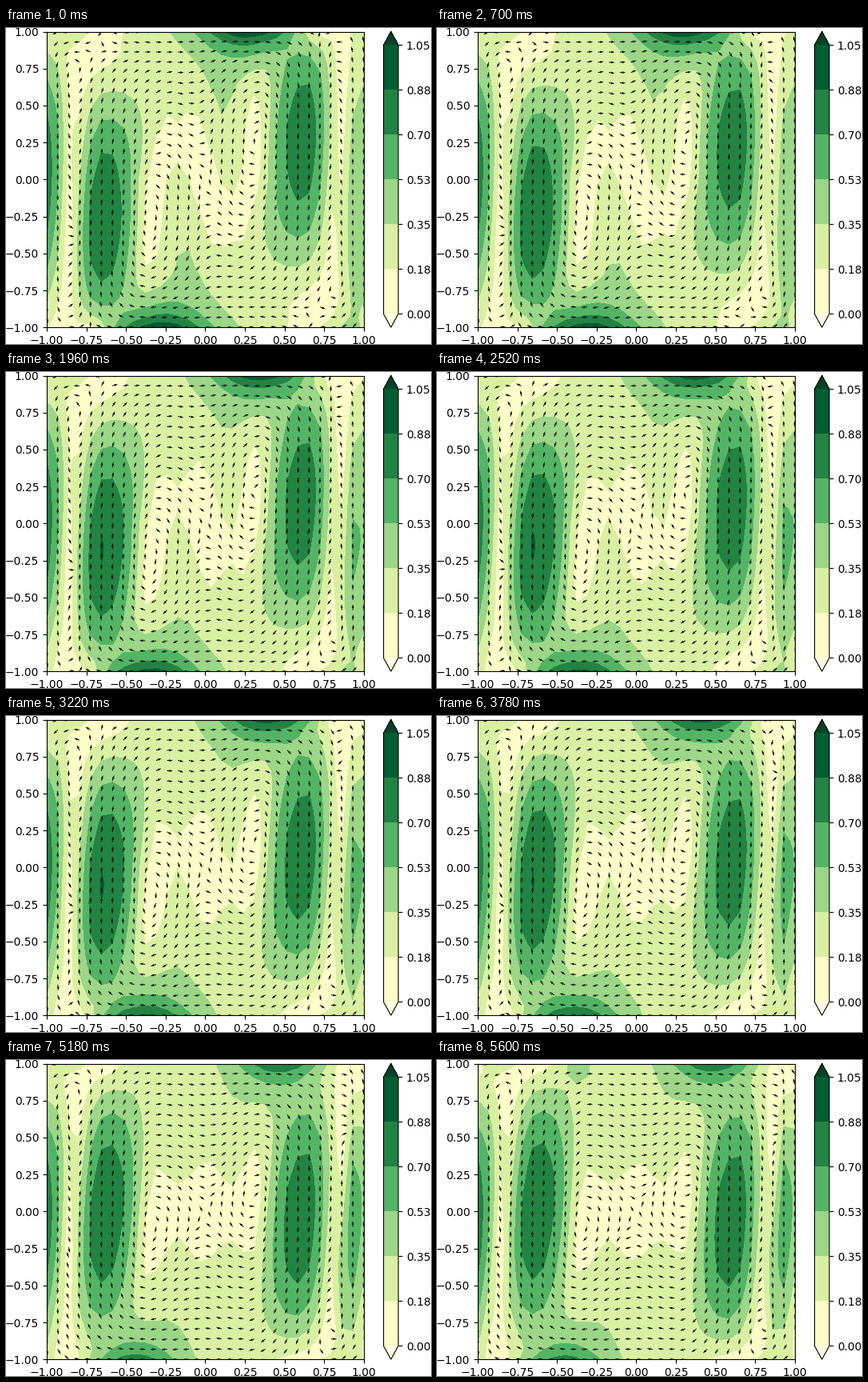
A matplotlib script for the animation above (5740 ms loop, 532 by 395 pixels).

```python
import numpy as np
import matplotlib.pyplot as plt
from matplotlib.animation import FuncAnimation

WIDTH, HEIGHT, DPI = 532, 395, 100
TICKS, INTERVAL = 41, 140
HOLDS = (2, 7, 11, 15, 19, 22, 26, 30, 34, 38)  # ticks that repeat the previous state
STEPS = TICKS - len(HOLDS) - 1
LEVELS = np.linspace(0, 1.05, 7)

axis = np.linspace(-1, 1, 30)
X, Y = np.meshgrid(axis, axis)


def jet(d, height, sigma, depth):
    """Wall jet: steep on its outer side (d > 0), soft on the inner one."""
    outer = np.cos(np.clip(d / 0.46, 0, 1) * np.pi / 2)
    inner = np.exp(-(d / sigma) ** 2 / 2)
    return np.where(d > 0, outer, inner) * np.exp((height - 1) / depth)


def lobe(y, center, k_below, k_above):
    """Vertical profile of a current, fading at the walls."""
    d = y - center
    return np.cos(d * np.where(d < 0, k_below, k_above)) * (1 - 0.7 * y ** 12)


def horizontal(t, mix):
    window = np.clip(1 - (X / 0.95) ** 2, 0, None)
    shear = np.sin(mix(1.3, 2.1) * (Y - mix(1.0, 0.25) * X))
    u = mix(0.22, 0.27) * shear * window * (1 + mix(0.4, 0.1) * Y ** 2)
    sigma, depth = mix(0.22, 0.2), mix(0.2, 0.17)
    u += mix(0.78, 0.65) * jet(X - mix(0.28, 0.5), Y, sigma, depth)
    u -= mix(0.77, 0.55) * jet(-X - mix(0.29, 0.47), -Y, sigma, depth)
    u += 0.22 * t ** 6 * np.exp(-((X + 0.38) / 0.13) ** 2 - ((Y - 1) / 0.16) ** 2)
    # Return flow between the side currents and the walls
    strength = np.where(X * Y < 0, mix(0.35, 0.28), 0.15)
    u -= strength * Y ** 5 * np.exp(-((np.abs(X) - 0.83) / 0.2) ** 2)
    return u


def wave_phase(t, mix):
    """Phase in quarter waves: zeros at even values, peaks at odd ones."""
    rows = []
    for y in axis:
        skew = mix(0.2, 0) * y
        left, middle, right = -0.34 + max(skew, 0), -skew, 0.31 + min(skew, 0)
        knots = [-1.04, -0.85, -0.64, left, (left + middle) / 2, middle,
                 (middle + right) / 2, right, 0.615, 0.835, mix(0.97, 0.925), 1.1]
        quarters = [*range(-1, 10), mix(9.5, 10.1)]
        rows.append(np.interp(axis - mix(0.03, 0.05) * y, knots, quarters))
    return np.array(rows)


def vertical(t, mix):
    phase = wave_phase(t, mix)
    left_edge = mix(0.87, 0.89) * np.cos(1.35 * (Y - mix(0.0, -0.12)))
    right_edge = mix(0.5, 0.66) * np.cos(mix(1.05, 1.4) * (Y + 0.11))
    left = (0.863 + 0.022 * np.sin(np.pi * t)) * lobe(
        Y, mix(-0.28, 0), mix(1.5, 1.39), mix(1.36, 1.39))
    right = mix(0.83, 0.84) * lobe(
        Y, mix(0.28, -0.05), mix(1.36, 1.37), mix(1.5, 1.37))
    tilt = mix(0.15, 0.03) * np.tanh(3 * Y)
    fade = 1 - Y ** 4
    core_left, core_right = [(mix(0.21, 0.14) + s * tilt) * fade for s in (-1, 1)]
    amplitude = np.select(
        [phase < 0, phase < 2, phase < 4, phase < 6, phase < 8],
        [left_edge, left, core_left, core_right, right], right_edge)
    return amplitude * np.sin(phase * np.pi / 2)


def field(t):
    def mix(a, b):
        return a + (b - a) * t

    u, v = horizontal(t, mix), vertical(t, mix)
    return u, v, np.hypot(u, v)


def pixel_axes(left, bottom, width, height):
    return fig.add_axes([left / WIDTH, bottom / HEIGHT, width / WIDTH, height / HEIGHT])


def draw_contours(speed):
    return ax.contourf(X, Y, speed, LEVELS, cmap="YlGn", extend="both", zorder=0)


fig = plt.figure(figsize=(WIDTH / DPI, HEIGHT / DPI), dpi=DPI, facecolor="white")
ax = pixel_axes(51, 20.8, 396.8, 369.6)
bar_ax = pixel_axes(472.6, 20.8, 18.48, 369.6)

u, v, speed = field(0)
contours = draw_contours(speed)
arrows = ax.quiver(X, Y, u / speed, v / speed)
ax.set(xlim=(-1, 1), ylim=(-1, 1),
       xticks=np.linspace(-1, 1, 9), yticks=np.linspace(-1, 1, 9))

bar = fig.colorbar(contours, cax=bar_ax, ticks=LEVELS)
bar.ax.set_yticklabels([f"{level + 1e-9:.2f}" for level in LEVELS])
bar.ax.minorticks_off()


def update(tick):
    global contours
    state = tick - sum(hold <= tick for hold in HOLDS)
    u, v, speed = field(state / STEPS)
    contours.remove()
    contours = draw_contours(speed)
    arrows.set_UVC(u / speed, v / speed)
    return contours, arrows


anim = FuncAnimation(fig, update, frames=TICKS, interval=INTERVAL,
                     init_func=lambda: update(0), repeat=True, repeat_delay=0)
plt.show()
```
